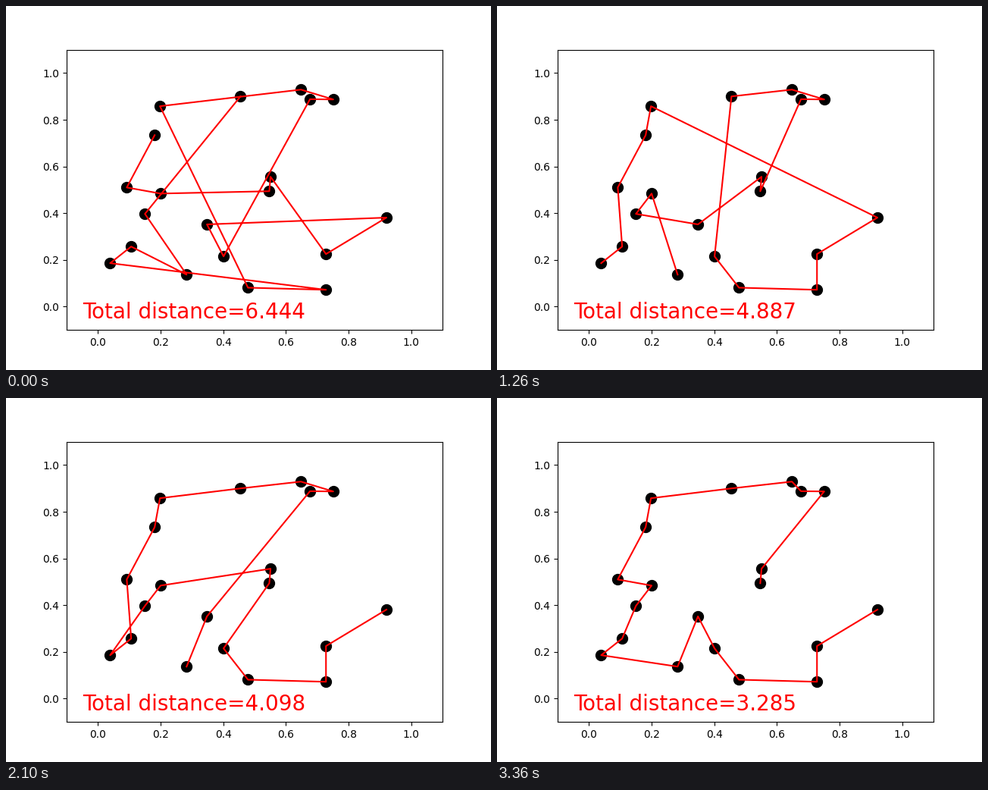
These frames come from a looping animation (640x480 px, 4.2 s). A matplotlib script:

```python
import matplotlib.pyplot as plt
from matplotlib.animation import FuncAnimation

CITIES = {
    "A": (0.198, 0.858), "B": (0.455, 0.900), "C": (0.648, 0.929),
    "D": (0.677, 0.888), "E": (0.751, 0.887), "F": (0.181, 0.734),
    "G": (0.092, 0.510), "H": (0.200, 0.484), "I": (0.150, 0.397),
    "J": (0.551, 0.556), "K": (0.547, 0.494), "L": (0.348, 0.352),
    "M": (0.401, 0.215), "N": (0.921, 0.381), "O": (0.728, 0.225),
    "P": (0.728, 0.072), "Q": (0.479, 0.081), "R": (0.283, 0.137),
    "S": (0.106, 0.257), "T": (0.039, 0.186),
}

# Best tour of each generation and its length
TOURS = [
    ("FGHKJONLMDECAQPTSRIB", 6.444),
    ("RHILMQDEJCBKPNOAFTSG", 6.198),
    ("RHGILJKEDCBMQPNOAFTS", 5.241),
    ("RHILJKDECBMQPONAFGST", 4.887),
    ("RIHLJKDECBMOPQNAFGST", 5.278),
    ("RLDECBAFGSTIHJKMQPON", 4.098),
    ("KJDECBAFHGISTRLMQPON", 3.351),
    ("KJDECBAFGHISTRLMQPON", 3.314),
    ("KJEDCBAFGHISTRLMQPON", 3.285),
]
STEP_MS = 420
STEPS = len(TOURS) + 1  # the final tour is held for two steps

fig, ax = plt.subplots(figsize=(6.4, 4.8), dpi=100)
ax.set_xlim(-0.1, 1.1)
ax.set_ylim(-0.1, 1.1)
ax.scatter(*zip(*CITIES.values()), s=100, c="k")
route, = ax.plot([], [], "r-")
label = ax.text(-0.05, -0.05, "", size=20, color="red")


def draw(step):
    tour, length = TOURS[min(step, len(TOURS) - 1)]
    route.set_data(*zip(*(CITIES[c] for c in tour)))
    label.set_text(f"Total distance={length:.3f}")
    return route, label


anim = FuncAnimation(fig, draw, frames=STEPS, interval=STEP_MS,
                     repeat=True, repeat_delay=0)
plt.show()
```
